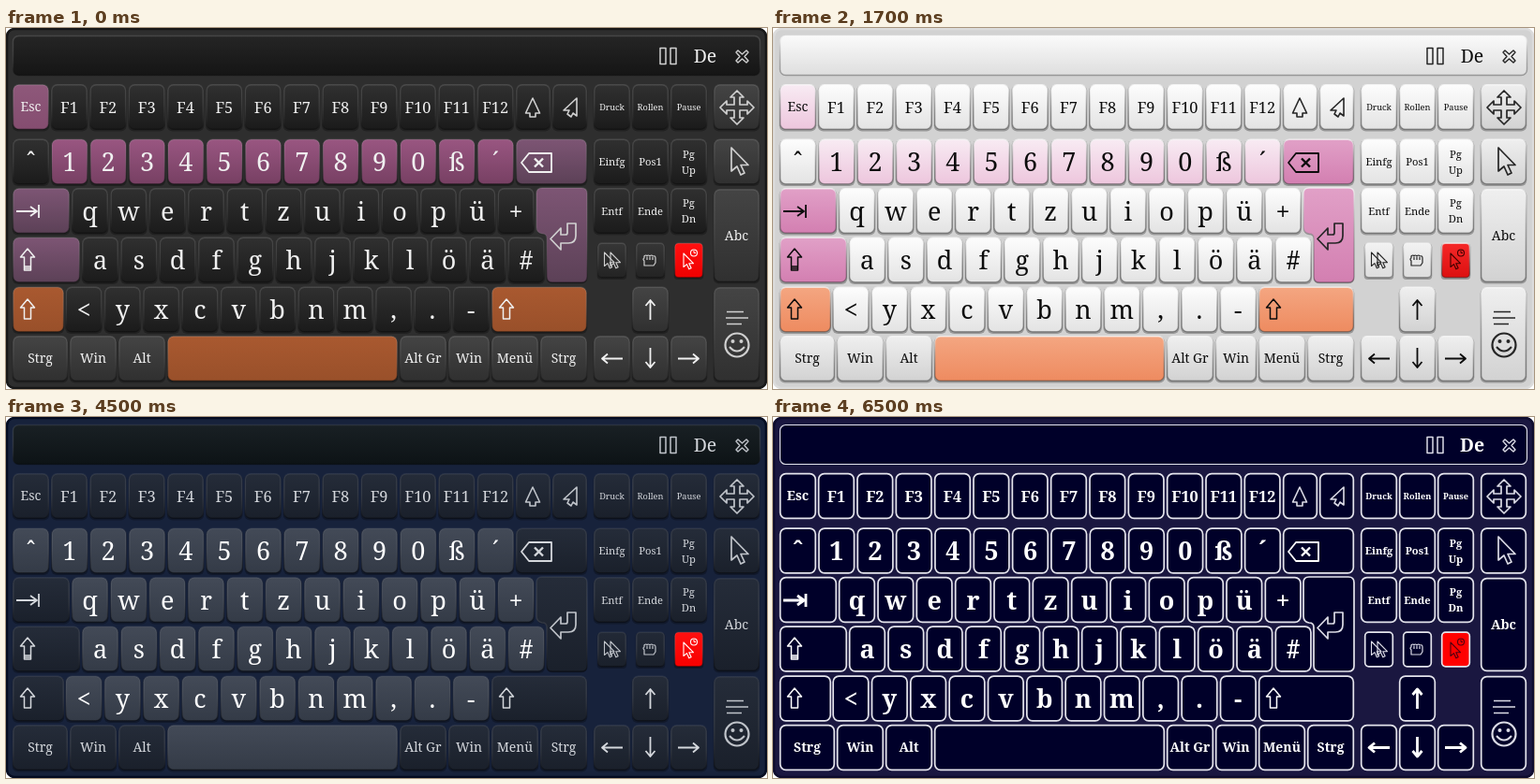
An HTML page that plays this animation: 812x386 px, repeating every 8 s.

```html
<!DOCTYPE html>
<html lang="de">
<head>
<meta charset="utf-8">
<style>
html, body { margin: 0; width: 100%; height: 100%; overflow: hidden; background: #fff; }
svg { display: block; width: 812px; height: 386px; }
text { font-family: "Noto Serif", serif; text-anchor: middle; }
</style>
</head>
<body>
<svg id="board" viewBox="0 0 812 386"></svg>
<script>
const board = document.getElementById('board');

// Key groups: f function, n navigation, l letter, d digit, c circumflex, e escape,
// b editing, k caps, s shift, p space, m/w modifiers, a arrows, r right column,
// t small tools, x active tool. Fills are "groups: top bottom".
const themes = [
  { bg: '#2e2e2e', edge: '#171717', bar: ['#252525', '#151515'], ink: '#f0f0f0', icon: '#d0d0d0', toolInk: '#fff', rim: [.13, .35],
    fills: { fnlc: '#303030 #1b1b1b', d: '#995681 #774063', e: '#8e587a #854d70', bk: '#7d5574 #5c4157',
      sp: '#a95930 #99502a', mwar: '#444444 #303030', t: '#363636 #232323', x: '#ff1010 #f00000' } },
  { bg: '#d2d2d2', edge: '#dcdcdc', bar: ['#fafafa', '#dedede'], ink: '#0c0c0c', icon: '#252525', toolInk: '#400000', rim: [.65, .3],
    fills: { fnlc: '#fdfdfd #e3e3e3', de: '#f8ebf3 #edc6dd', bk: '#e1a0c7 #d37fb1',
      sp: '#f4a681 #ee8b60', mwar: '#efefef #d2d2d2', t: '#f2f2f2 #dddddd', x: '#f52828 #dc1010' } },
  { bg: '#1b1b1b', edge: '#000', bar: ['#0e1820', '#141c22'], ink: '#f4f4ee', icon: '#dcdcd6', toolInk: '#dcdcd6', rim: [.13, .35],
    fills: { f: '#43453a #35372d', nbarw: '#40423a #31332b', ldcp: '#5b5a00 #413f00', eksm: '#4a3629 #38281e', tx: '#383a32 #2e3028' } },
  { bg: '#17223b', edge: '#030b20', bar: ['#192024', '#0d1316'], ink: '#d4d7dc', icon: '#c0c4ca', toolInk: '#fff', rim: [.08, .4],
    fills: { fnebksmwar: '#252c39 #1a202b', ldcp: '#434a57 #343b47', t: '#222936 #1a202b', x: '#ff1010 #f80000' } },
  { bg: '#1a1740', edge: '#0d0b2c', bar: ['#000029', '#000029'], ink: '#fff', icon: '#dcdce6', toolInk: '#500010', line: '#e4e4ec', bold: true,
    fills: { fnldcebkspmwart: '#000029 #000029', x: '#ff0000 #ff0000' } }
];
const starts = [0, 500, 2500, 4500, 6500];

// Each key: group, x, y, width, height, label, font size, label baseline.
const keys = [];
const add = (g, x, y, w, h = 49, label = '', size = 14, base = y + 29) =>
  keys.push({ g, x, y, w, h, label, size, base });
const row = (g, x, y, labels, size, base, step = 41.33) =>
  labels.forEach((s, i) => add(g, x + i * step, y, 39, 49, s, size, base));

add('e', 7, 60, 39, 49, 'Esc', 14, 89);
row('f', 48, 60, [...Array(12).keys()].map(i => 'F' + (i + 1)), 16.4, 91);
add('f', 544, 60, 37);
add('f', 583, 60, 37);
row('n', 627, 60, ['Druck', 'Rollen', 'Pause'], 9.2, 88, 41);
row('c', 7, 118.5, ['ˆ'], 27, 153);
row('d', 48.3, 118.5, [...'1234567890ß´'], 27, 153);
add('b', 544, 118.5, 76);
row('n', 627, 118.5, ['Einfg', 'Pos1', 'Pg|Up'], 11.2, 147, 41);
add('b', 7, 171, 61);
row('l', 70, 171, [...'qwertzuiopü+'], 27, 206);
row('n', 627, 171, ['Entf', 'Ende', 'Pg|Dn'], 11.2, 199.5, 41);
add('k', 7, 223.5, 72);
row('l', 81, 223.5, [...'asdfghjklöä#'], 27, 258);
add('s', 7, 276.5, 55);
row('l', 63.5, 276.5, [...'<yxcvbnm,.-'], 27, 311);
add('s', 518, 276.5, 102);
[['m', 7, 59, 'Strg'], ['m', 68, 50, 'Win'], ['m', 120, 50, 'Alt'], ['p', 172, 246, ''],
 ['m', 420, 50, 'Alt Gr'], ['w', 472, 44, 'Win'], ['w', 518, 50, 'Menü'], ['m', 570, 50, 'Strg']]
  .forEach(([g, x, w, s]) => add(g, x, 329, w, 49, s, 14, 358));
row('a', 627, 329, ['', '', ''], 14, 358, 41);
add('a', 668, 276.5, 39);
[631, 672, 713].forEach((x, i) => add(i < 2 ? 't' : 'x', x, 229.5, 31, 38));
add('r', 755, 60, 49);
add('r', 755, 118.5, 49);
add('r', 755, 172, 49, 100, 'Abc', 14, 227);
add('r', 755, 277, 49, 101);

const enter = 'M572 171H614Q620 171 620 177V266Q620 272 614 272H583Q577 272 577 266V225Q577 220 572 220Q566 219 566 213V177Q566 171 572 171Z';
const pointer = 'M0 0V25L6 20L10 29L14 27L10 18.500H18Z';
const shift = 'l7.500 9h-4v12h-7v-12h-4Z';

const path = (d, color, width, more = '') =>
  `<path d="${d}" fill="none" stroke="${color}" stroke-width="${width}" stroke-linejoin="round" ${more}/>`;
const box = (x, y, w, h, r, attrs) =>
  `<rect x="${x}" y="${y}" width="${w}" height="${h}" rx="${r}" ${attrs}/>`;
const text = (s, x, y, size, color, bold) =>
  `<text x="${x}" y="${y}" font-size="${size}" fill="${color}" ${bold ? 'font-weight="700"' : ''}>${s.replace('<', '&lt;')}</text>`;
const gradient = (id, a, b) =>
  `<linearGradient id="${id}" x2="0" y2="1"><stop stop-color="${a}"/><stop offset="1" stop-color="${b}"/></linearGradient>`;
const mark = (x, y, k, color, fill = 'none') =>
  `<path d="${pointer}" transform="translate(${x} ${y}) scale(${k})" fill="${fill}" stroke="${color}" stroke-width="${k < 1 ? 1.9 : 1.7}" stroke-linejoin="round"/>`;

function icons(t) {
  const c = t.icon, ink = t.ink, wide = t.bold ? 2.8 : 1.8;
  const thin = (d, w = 1.6) => path(d, c, w);
  return [
    thin('M698 21.500h6v17h-6ZM709 21.500h6v17h-6Z', 1.5),
    thin('M781 24l4.500 4 4.500-4 2 2-4 4.500 4 4.500-2 2-4.500-4-4.500 4-2-2 4-4.500-4-4.500Z', 1.4),
    thin('M562 75l7.500 16h-4.500v4h-6v-4h-4.500Z'),
    thin('M609 75l-14 13h6l-2 4 4 3 2-4 4 3Z'),
    thin('M780 67l7 7h-4v8h8v-4l7 7-7 7v-4h-8v8h4l-7 7-7-7h4v-8h-8v4l-7-7 7-7v4h8v-8h-4Z', 1.7),
    mark(774, 128, 1, c),
    path('M550 144l8-10h24v20h-24Z', ink, 1.8) + path('M564 139.500l9 9m0-9l-9 9', ink, 2.4),
    thin('M599 209h9v13q0 8-8 8h-8v7l-11-11.500 11-11.500v7h5q2 0 2-2Z', 1.7),
    path('M11 196h22m-7-5l7 5-7 5M35 189v14', ink, wide),
    path('M23 236' + shift + 'M19.500 259v-4h7v4Z', ink, 1.5),
    path('M23 290' + shift, ink, 1.5),
    path('M534 290' + shift, ink, 1.5),
    path('M687.500 312v-21m-5 6l5-6 5 6', ink, wide),
    path('M687.500 342v21m-5-6l5 6 5-6', ink, wide),
    path('M658 353.500h-22m6-5l-6 5 6 5', ink, wide),
    path('M717 353.500h22m-6-5l6 5-6 5', ink, wide),
    mark(638.500, 240, .58, c), mark(645, 240, .58, c),
    thin('M681 254v-5q-2-2 0-3v-2q2-2 3 0 1-2 3 0 2-2 3 0 3-1 3 2v5l-2 3Zm3-9v3m3-3v3m3-3v3', 1.2),
    mark(723, 241, .58, t.toolInk),
    `<circle cx="734" cy="240.500" r="3.500" fill="none" stroke="${t.toolInk}" stroke-width="1.100"/>`,
    path('M734 238v2.500h2', t.toolInk, 1),
    path('M769 303.500h18M768 310h24M769 316.500h16', c, 1.7),
    `<circle cx="780" cy="339" r="12.500" fill="none" stroke="${c}" stroke-width="2.200"/>`,
    `<circle cx="775.500" cy="335" r="2" fill="${c}"/><circle cx="784.500" cy="335" r="2" fill="${c}"/>`,
    path('M772 341q8 9 16 0', c, 2)
  ].join('');
}

function draw(t) {
  let defs = gradient('bar', ...t.bar);
  for (const [groups, colors] of Object.entries(t.fills))
    for (const g of groups) defs += gradient(g, ...colors.split(' '));
  if (!t.line) defs += gradient('rim', `rgba(255,255,255,${t.rim[0]})`, `rgba(0,0,0,${t.rim[1]})`);
  const rim = t.line ? `stroke="${t.line}" stroke-width="1.700"` : 'stroke="url(#rim)" stroke-width="1.400"';
  const shade = 'fill="#000" opacity=".28"';

  let out = `<defs>${defs}</defs>` + box(1, 1, 810, 384, 8, `fill="${t.bg}" stroke="${t.edge}" stroke-width="2.500"`);
  out += box(7.5, 8.5, 797, 42, 6, `fill="url(#bar)" ` + (t.line ? `stroke="${t.line}" stroke-width="1.100"` : rim));
  if (!t.line) out += `<path d="${enter}" transform="translate(0 1.300)" ${shade}/>`;
  out += `<path d="${enter}" fill="url(#b)" ${rim}/>`;
  for (const k of keys) {
    const small = 'tx'.includes(k.g), r = small ? 4 : 6;
    if (!t.line) out += box(k.x - .3, k.y + 1, k.w + .6, k.h + .6, r, shade);
    out += box(k.x + .7, k.y + .7, k.w - 1.4, k.h - 1.4, r, `fill="url(#${k.g})" ${rim}`);
    const color = t === themes[3] && 'ldcp'.includes(k.g) ? '#fff' : t.ink;
    const lines = k.label.split('|');
    lines.forEach((s, i) => {
      const y = k.base + (lines.length > 1 ? i * 17 - 8.5 : 0);
      if (s) out += text(s, k.x + k.w / 2, y, k.size, color, t.bold);
    });
  }
  board.innerHTML = out + text('De', 746, 37, 19.5, t.ink, t.bold) + icons(t);
}

let shown = -1;
const origin = performance.now();
function tick() {
  const time = (performance.now() - origin) % 8000;
  const now = starts.filter(s => s <= time).length - 1;
  if (now !== shown) draw(themes[shown = now]);
  requestAnimationFrame(tick);
}
tick();
</script>
</body>
</html>
```
